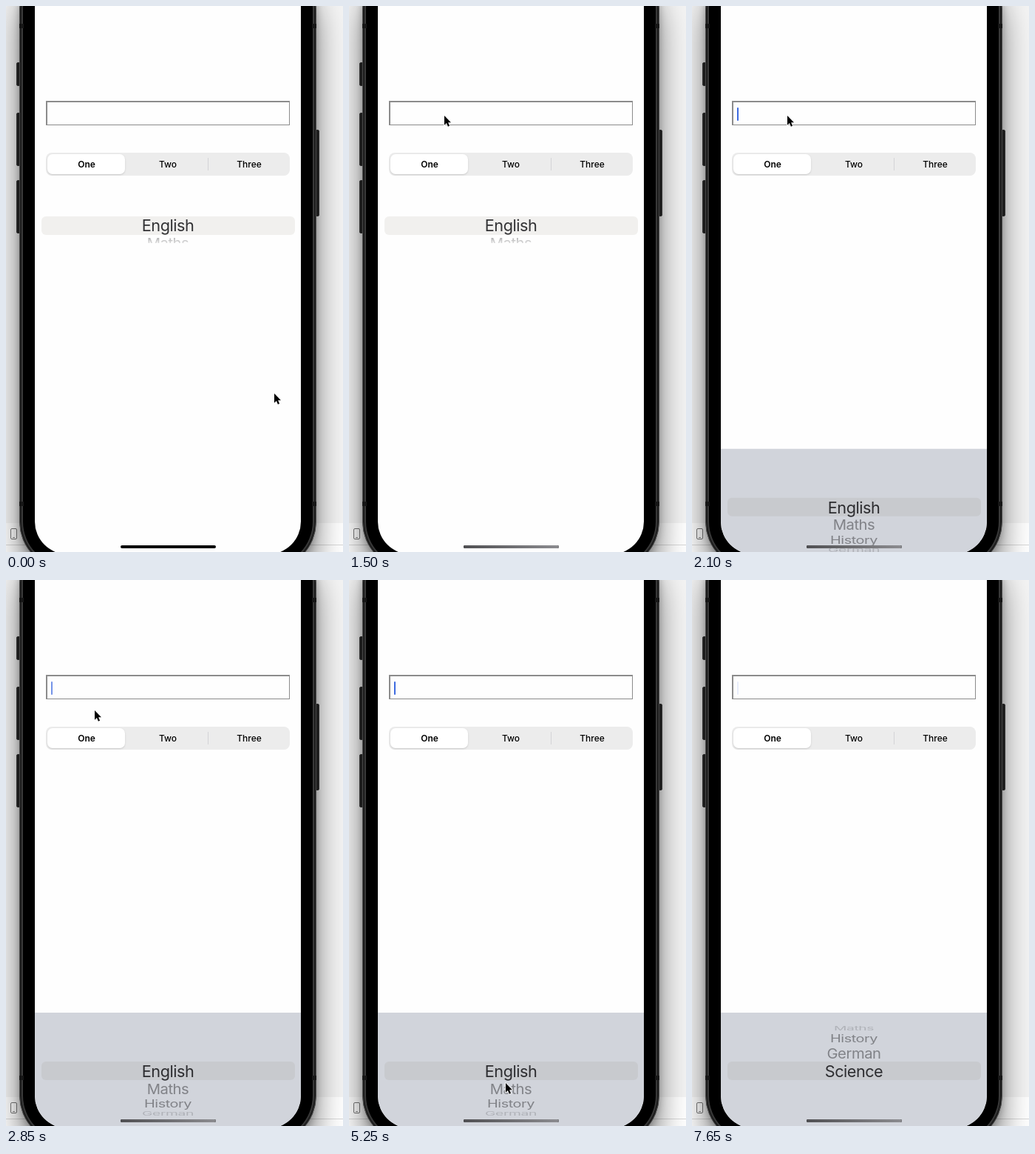
Animation of 456 by 737 pixels, one loop 7750 ms. Source, as an HTML page:

```html
<!DOCTYPE html>
<html lang="en">
<head>
<meta charset="utf-8">
<title>Picker demo</title>
<style>
  html, body { margin: 0; width: 100%; height: 100%; overflow: hidden; }
  body { position: relative; background: #f4f4f4; font-family: Inter, Roboto, sans-serif; }
  div, svg { position: absolute; box-sizing: border-box; }
  #stage { left: 0; top: 0; width: 456px; height: 737px; overflow: hidden; }

  .strip { left: 0; top: 698px; width: 456px; height: 39px; background: #fff; }
  .strip::after { content: ""; position: absolute; top: 29px; width: 100%; height: 1px; background: #d9d9d9; }
  .icon { left: 6px; top: 705px; width: 9px; height: 15px; border: 1px solid #777; border-radius: 2px; }
  .icon::after { content: ""; position: absolute; left: 2px; bottom: 1px; width: 3px; height: 1px; background: #888; }

  .button { width: 6px; background: #2a2a2a; border: 1px solid #3c3c3c; border-radius: 2px; }
  .body { left: 18px; top: -61px; width: 402px; height: 822px; border-radius: 65px; background: #000;
    border: 1px solid #4a4a4a;
    box-shadow: inset 0 0 0 2px #1c1c1c, inset 0 0 0 4px #383838,
      0 30px 40px rgba(0,0,0,.5), 0 4px 10px rgba(0,0,0,.22); }
  .band { width: 6px; height: 6px; background: #161616; }
  .screen { left: 39px; top: 0; width: 360px; height: 740px; background: #fefefe;
    border-radius: 0 0 44px 44px; overflow: hidden; }

  .field { left: 15px; top: 128px; width: 330px; height: 33px; border: solid #8c8c8c; border-width: 2px 1px 1px 2px; }
  #caret { left: 22px; top: 136.5px; width: 2px; height: 18px; border-radius: 1px; background: #3c6ae0; }

  .segments { left: 15px; top: 198px; width: 330px; height: 31px; border-radius: 8px; background: #ececec; }
  .segments i { position: absolute; left: 219px; top: 7px; width: 1px; height: 17px; background: #d4d4d6; }
  .thumb { left: 2px; top: 2px; width: 105px; height: 27px; border-radius: 7px; background: #fff;
    box-shadow: 0 1px 3px rgba(0,0,0,.1), 0 1px 1px rgba(0,0,0,.05); }
  .label { top: 0; width: 110px; line-height: 31px; font-size: 12px; font-weight: 500; text-align: center; color: #000; }
  .label.on { font-weight: 600; }

  .pick { left: 9px; width: 343px; height: 25px; border-radius: 6px; background: rgba(110,100,80,.09); }
  .row { left: 180px; font-size: 21.7px; line-height: 26px; letter-spacing: -.5px; white-space: nowrap; color: #18181b; }
  #inline { left: 0; top: 272px; width: 360px; height: 48px; overflow: hidden;
    -webkit-mask-image: linear-gradient(#000 76%, rgba(0,0,0,.35));
    mask-image: linear-gradient(#000 76%, rgba(0,0,0,.35)); }
  #panel { left: 0; top: 584px; width: 360px; height: 160px; background: #d1d4db; overflow: hidden; }

  .home { left: 116px; top: 727.5px; width: 129px; height: 4.5px; border-radius: 3px; background: #000; }
  #homeFade { background: linear-gradient(90deg, #505053, #8c8c90); }
  #pointer { left: 0; top: 0; overflow: visible; }
</style>
</head>
<body>
<div id="stage">
  <div class="strip"></div>
  <div class="icon"></div>
  <div class="button" style="left:14px;top:76px;height:32px"></div>
  <div class="button" style="left:14px;top:144px;height:72px"></div>
  <div class="button" style="left:14px;top:235px;height:72px"></div>
  <div class="button" style="left:418px;top:167px;height:117px"></div>
  <div class="body"></div>
  <div class="band" style="left:18px;top:24px"></div>
  <div class="band" style="left:414px;top:24px"></div>
  <div class="band" style="left:18px;top:669px"></div>
  <div class="band" style="left:414px;top:669px"></div>

  <div class="screen">
    <div class="field"></div>
    <div id="caret"></div>
    <div class="segments">
      <div class="thumb"></div><i></i>
      <div class="label on" style="left:0">One</div>
      <div class="label" style="left:110px">Two</div>
      <div class="label" style="left:220px">Three</div>
    </div>
    <div id="inline"></div>
    <div id="panel"></div>
    <div class="home"></div>
    <div class="home" id="homeFade"></div>
  </div>

  <svg id="pointer" width="14" height="20">
    <path transform="scale(.88)" d="M0 0V14.6L3.3 11.5 5.6 16.7 8 15.7 5.8 10.5H10.2Z"
      stroke="#fff" stroke-width="1.8" stroke-linejoin="round" paint-order="stroke"/>
  </svg>
</div>

<script>
const LOOP = 7750, STEP = 150;
const OPEN_AT = 1950, POINTER_GONE = 6900;
const SUBJECTS = ["English", "Maths", "History", "German", "Science"];
const RADIUS = 62, ROW_ANGLE = Math.PI / 8;

const POINTER_START = { x: 363, y: 523 };
const POINTER_MOVES = [
  { from: 0, until: 300, x: 370, y: 560 },
  { from: 300, until: 1100, x: 129, y: 148 },
  { from: 2100, until: 2850, x: 120, y: 176 },
  { from: 2850, until: 3150, x: 168, y: 331 },
  { from: 4350, until: 5250, x: 212, y: 679 },
  { from: 5400, until: 6150, x: 189, y: 471 }
];

const $ = id => document.getElementById(id);
const clamp = v => Math.min(1, Math.max(0, v));

function ease(t, from, until) {
  const u = clamp((t - from) / (until - from));
  return u * u * (3 - 2 * u);
}

function pointerAt(t) {
  return POINTER_MOVES.reduce((p, move) => {
    const u = ease(t, move.from, move.until);
    return { x: p.x + (move.x - p.x) * u, y: p.y + (move.y - p.y) * u };
  }, POINTER_START);
}

// The blink holds solid after focus and restarts when the wheel is touched
function caretOpacity(t) {
  if (t < OPEN_AT) return 0;
  const since = Math.max(0, t - (t < 5175 ? 2625 : 5175));
  return clamp(.55 + .7 * Math.cos(2 * Math.PI * since / 1050));
}

// Critically damped spring for the rising panel
function panelOffset(t) {
  const x = Math.max(0, t - 1880) * .0183;
  return 153 * (1 + x) * Math.exp(-x);
}

function makeWheel(parent, center) {
  const add = (className, top, text = "") => {
    const el = document.createElement("div");
    el.className = className;
    el.style.top = top + "px";
    el.textContent = text;
    parent.append(el);
    return el;
  };
  add("pick", center - 12.5);
  const rows = SUBJECTS.map(name => add("row", center, name));

  return turn => rows.forEach((row, i) => {
    const angle = (i - turn) * ROW_ANGLE;
    const depth = Math.max(0, Math.cos(angle));
    const selected = Math.abs(i - turn) < .5;
    const size = selected ? 1 : .86 + .08 * depth;
    row.style.opacity = selected ? .88 : Math.min(.43, 1.2 * depth * depth);
    row.style.transform = `translate(-50%, -50%) translateY(${RADIUS * Math.sin(angle)}px) scale(${size}, ${size * depth})`;
  });
}

const turnInline = makeWheel($("inline"), 24);
const turnPanel = makeWheel($("panel"), 78.5);
turnInline(0);

function render(now) {
  const t = Math.floor((now % LOOP) / STEP) * STEP;
  const open = t >= OPEN_AT;
  const { x, y } = pointerAt(t);
  $("pointer").style.transform = `translate(${x}px, ${y}px)`;
  $("pointer").style.display = t < POINTER_GONE ? "block" : "none";
  $("caret").style.opacity = caretOpacity(t);
  $("homeFade").style.opacity = ease(t, 1050, 1500);
  $("inline").style.display = open ? "none" : "block";
  $("panel").style.display = open ? "block" : "none";
  $("panel").style.transform = `translateY(${panelOffset(t)}px)`;
  turnPanel(4 * ease(t, 5400, 6150));
}

const start = performance.now();
function frame() {
  render(performance.now() - start);
  requestAnimationFrame(frame);
}
frame();
</script>
</body>
</html>
```
